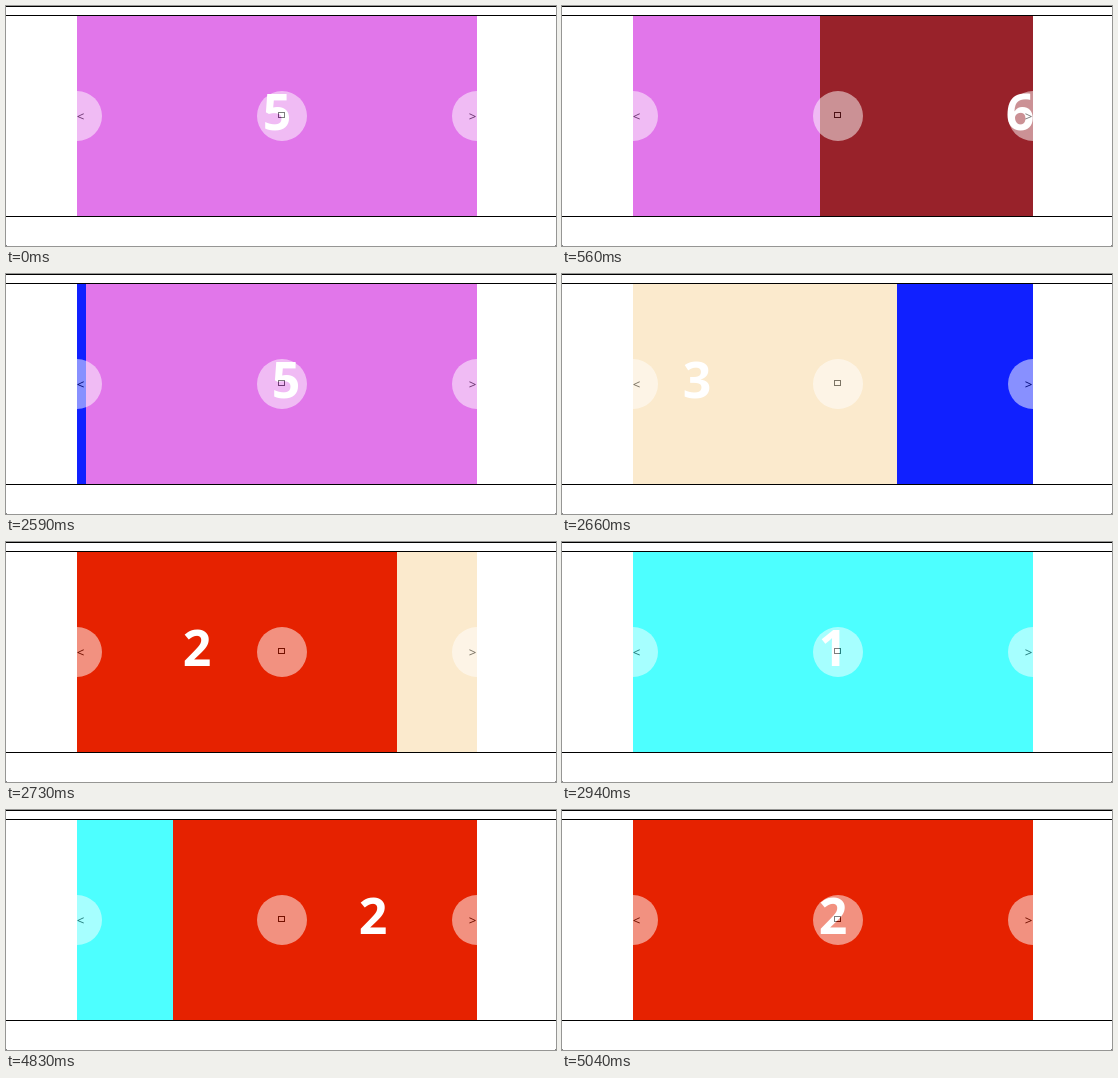
These frames come from a looping animation (550 px wide and 240 px high, 5.11 s). An HTML page:

```html
<!DOCTYPE html>
<html lang="en">
<head>
<meta charset="utf-8">
<title>Carousel</title>
<style>
  html, body { margin: 0; width: 100%; height: 100%; overflow: hidden; background: #fff; }
  svg { display: block; width: 550px; height: 240px; }
  text { font-family: "Noto Sans", "Open Sans", sans-serif; text-anchor: middle; }
  .digit { font-size: 50px; font-weight: 700; fill: #fff; }
  .button { opacity: .5; }
  .button circle { fill: #fff; }
  .button text { font-size: 13.33px; }
</style>
</head>
<body>
<svg viewBox="0 0 550 240">
  <defs>
    <clipPath id="view"><rect x="71" y="10" width="400" height="200"/></clipPath>
  </defs>
  <g clip-path="url(#view)">
    <g id="track"></g>
    <g class="button"><circle cx="71" cy="110" r="25"/><text x="74.5" y="115">&lt;</text></g>
    <g class="button">
      <circle cx="276" cy="110" r="25"/>
      <rect x="272.5" y="106.5" width="6" height="5" fill="none" stroke="#000"/>
    </g>
    <g class="button"><circle cx="471" cy="110" r="25"/><text x="466.5" y="115">&gt;</text></g>
  </g>
  <path d="M0 .5H550M0 9.5H550M0 210.5H550" stroke="#000" shape-rendering="crispEdges"/>
  <path d="M0 239h1v1h-1zM549 239h1v1h-1z" fill="#888"/>
</svg>
<script>
const LOOP = 5110, STEP = 70, WIDTH = 400;
const SETTLE = 350;   // visible part of a slide move
const LEAD = 74;      // time already elapsed at its first visible step
const DURATION = 465;

const colors = ['#4dffff', '#e62200', '#fbeacd', '#1020ff', '#e176ea', '#98222a'];
const moves = [
  { at: 490, from: 4, to: 5 },
  { at: 2590, from: 5, to: 0 },
  { at: 4690, from: 0, to: 1 }
];

const track = document.getElementById('track');
track.innerHTML = colors.map((color, i) => {
  const x = 71 + i * WIDTH;
  return `<rect x="${x}" y="10" width="${WIDTH}" height="200" fill="${color}"/>` +
    `<text class="digit" x="${x + WIDTH / 2}" y="124">${i + 1}</text>`;
}).join('');

// cubic-bezier(.25, .1, .25, 1)
function ease(x) {
  let lo = 0, hi = 1;
  for (let i = 0; i < 24; i++) {
    const u = (lo + hi) / 2;
    if (.75 * u - .75 * u * u + u ** 3 < x) lo = u; else hi = u;
  }
  const v = 1 - lo;
  return .3 * lo * v * v + 3 * lo * lo * v + lo ** 3;
}

function position(t) {
  let index = moves[0].from;
  for (const { at, from, to } of moves) {
    if (t < at) break;
    const held = Math.floor((t - at) / STEP) * STEP;
    const p = held >= SETTLE ? 1 : ease((held + LEAD) / DURATION);
    index = from + (to - from) * p;
  }
  return index;
}

function draw(t) {
  track.setAttribute('transform', `translate(${-Math.round(position(t) * WIDTH)} 0)`);
}

const start = performance.now();
function tick() {
  draw((performance.now() - start) % LOOP);
  requestAnimationFrame(tick);
}
draw(0);
requestAnimationFrame(tick);
</script>
</body>
</html>
```
